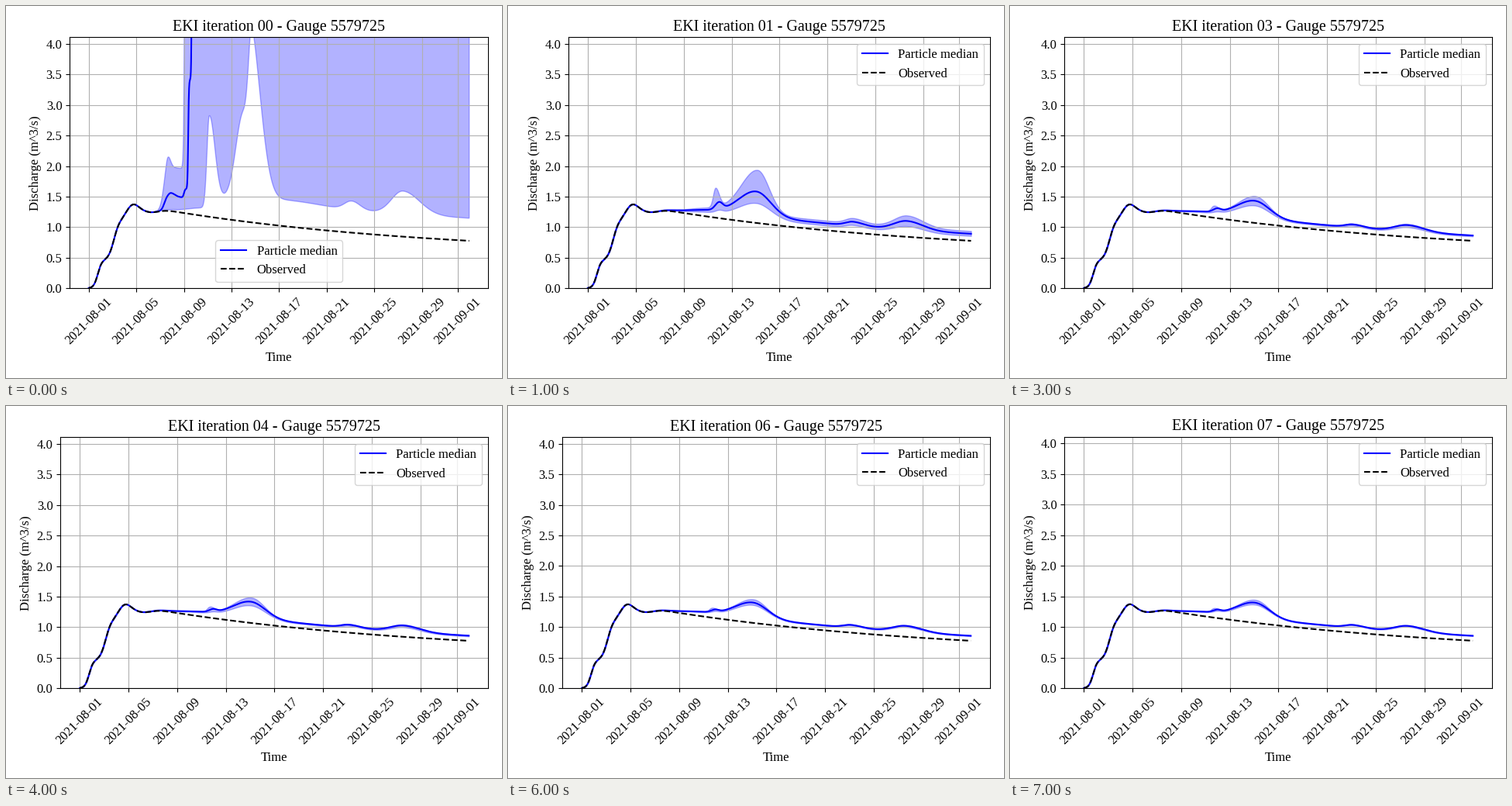
Write a matplotlib script that moves like this. It is 640 px wide and 480 px high and loops after 8000 ms.

```python
import matplotlib.pyplot as plt
import numpy as np
from matplotlib.animation import FuncAnimation

W, H, DPI = 640, 480, 100
DAYS = 31.97
BOTTOM, RIGHT = 115.7, 622.2
plt.rcParams.update({"font.family": "Liberation Serif", "font.size": 12})

t = np.linspace(0, DAYS, 3201)


def step(center, width):
    return (1 + np.tanh((t - center) / (2 * width))) / 2


def bump(center, height, rise, fall):
    """Bell curve with separate widths before and after its peak."""
    width = np.where(t < center, rise, fall)
    return height * np.exp(-((t - center) / width) ** 2 / 2)


# Three quick rises, then a slow recession
recession = .53 + .703 * np.exp((8 - t) / 23)
rise = .31 * step(.76, .17) + .485 * step(2.12, .24) + .205 * step(3.15, .25)
observed = (recession * rise + bump(3.8, .04, .35, .35)
            - bump(5.05, .08, .75, .75))
onset = step(8.4, .8)

# Storms: peak day, rise width, fall width
STORMS = ((10.95, .32, .3), (14.05, 1.45, 1.22),
          (22.1, .6, .9), (26.6, 1.05, 1.35))
FLASHY = ((10.65, .2, .3), (14.15, 1.38, .97)) + STORMS[2:]


def hydrograph(base, heights, storms=STORMS):
    peaks = sum(bump(c, h, r, f) for h, (c, r, f) in zip(heights, storms))
    return observed + base * onset + peaks


middle = hydrograph(.115, (.115, .4, .065, .145))
low = hydrograph(.08, (.035, .245, .045, .095))
high = hydrograph(.16, (.31, .71, .08, .19), FLASHY)

# The first ensemble runs away
wild_middle = (observed + .25 * step(6.35, .12) + bump(6.9, .05, .2, .3)
               + .15 * step(8, .05) + 1.8 * step(8.36, .03)
               + 50 * step(8.73, .025))
wild_high = (observed + .72 * step(6.27, .14) + bump(6.65, .2, .15, .22)
             + 50 * step(8.16, .045))
wild_low = (hydrograph(.16, (1.5, 1.4, 1.92, .14, .375),
                       ((10.14, .2, .48), (13, .62, .8), (13.74, .28, .85),
                        (22.1, .6, .7), (26.4, .95, 1.4)))
            + .21 * step(11, .3) + bump(17, .06, 1.5, 2.5))


def ensemble(k):
    """Lower edge, median and upper edge after k iterations."""
    if k == 0:
        return wild_low, wild_middle, wild_high
    if k < 3:
        mix, down, up = np.array([.74, .76, .94]) ** (k - 1)
    else:
        mix, down, up = (np.array([.2, .41, .22])
                         * np.array([.6, .8, .88]) ** (k - 3))
    median = low + mix * (middle - low)
    return (median - down * (middle - low), median,
            median + up * np.maximum(high - middle, 0))


def axes_box(k):
    left = 82.2 if k == 0 else 78.2 if k < 3 else 70.2
    top = 439.7 + .3 * max(k - 5, 0)
    return [left / W, BOTTOM / H, (RIGHT - left) / W, (top - BOTTOM) / H]


fig = plt.figure(figsize=(W / DPI, H / DPI), dpi=DPI)
ax = fig.add_axes(axes_box(0))
median_line, = ax.plot(t, middle, color="blue", label="Particle median")
ax.plot(t, observed, "--", color="black", label="Observed")
ax.set_xlim(-.05 * DAYS, 1.05 * DAYS)
ax.set_ylim(0, 4.11)
ax.set_yticks(np.arange(0, 4.1, .5))
days = list(range(0, 29, 4))
dates = [f"2021-08-{d + 1:02d}" for d in days]
ax.set_xticks(days + [31], dates + ["2021-09-01"], rotation=45)
ax.grid(True)
ax.set_xlabel("Time")
ax.set_ylabel("Discharge (m^3/s)")
legend = ax.legend(loc="upper right")
band = None


def draw(k):
    global band
    lower, median, upper = ensemble(k)
    ax.set_position(axes_box(k))
    ax.set_title(f"EKI iteration {k:02d} - Gauge 5579725")
    median_line.set_ydata(median)
    if band is not None:
        band.remove()
    band = ax.fill_between(t, lower, upper, color="blue", alpha=.3)
    legend.set_loc("lower center" if k == 0 else "upper right")
    return median_line, band


anim = FuncAnimation(fig, draw, frames=8, interval=1000, repeat=True,
                     repeat_delay=0, blit=False)
plt.show()
```
